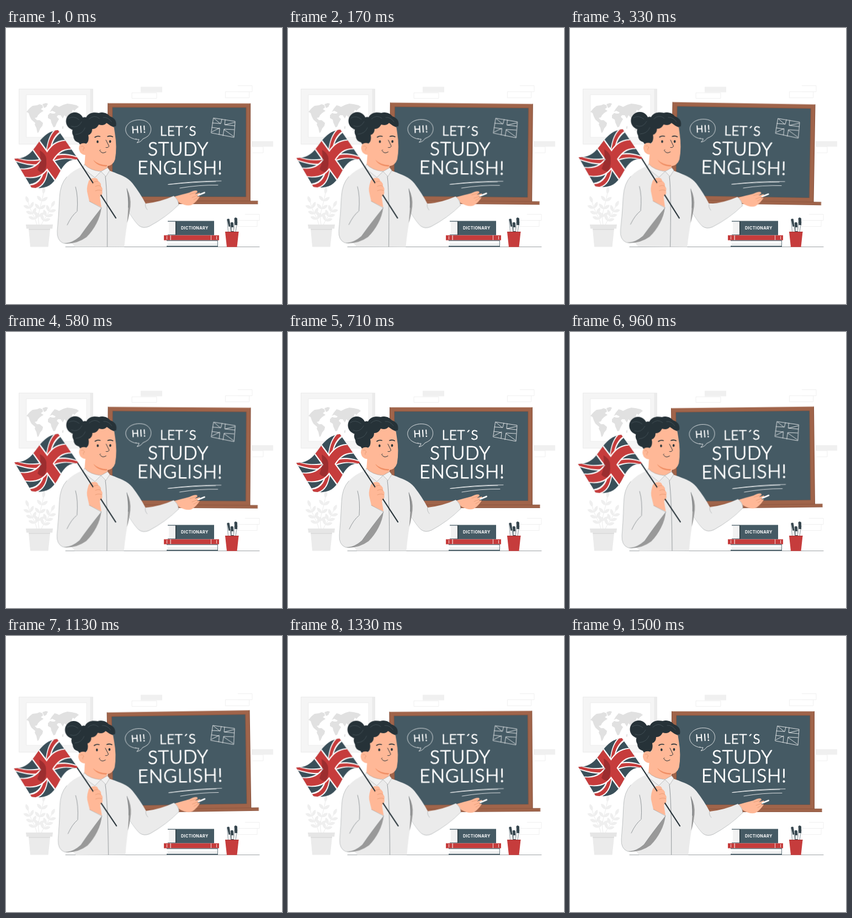
Write an HTML page that moves like this. It is 500 by 500 pixels and loops after 1540 ms.

```html
<!DOCTYPE html>
<html lang="en">
<head>
<meta charset="utf-8">
<title>Let's study English</title>
<style>
  html, body { margin: 0; width: 100%; height: 100%; overflow: hidden; background: #fff; }
  svg { display: block; width: 100%; height: 100%; }
  .sway { transform-box: view-box; animation: sway 1.54s linear infinite; }
  #board { transform-origin: 320px 227px; }
  #teacher { transform-origin: 187px 275px; }
  @keyframes sway {
    0%, 100% { transform: rotate(.1deg); }
    22% { transform: rotate(1deg); }
    71% { transform: rotate(-1deg); }
  }
  .chalk { font-family: Lato, sans-serif; font-weight: 300; fill: #fff; stroke: #fff; stroke-width: 1.1; stroke-linejoin: round; text-anchor: middle; }
  .sketch { fill: none; stroke: #fff; stroke-width: .8; stroke-linecap: round; stroke-linejoin: round; }
  .title { font: 700 7.3px Inter, sans-serif; letter-spacing: .35px; fill: #fff; }
  .line { fill: none; stroke: #263238; stroke-width: .45; stroke-linecap: round; stroke-linejoin: round; }
  .soft { opacity: .55; }
  .crease { stroke: #d98b63; stroke-width: .6; }
  .curl { stroke: #607078; }
  .face { fill: none; stroke: #263238; stroke-width: 1; stroke-linecap: round; stroke-linejoin: round; }
  .brow { stroke-width: 1.7; }
  .red { fill: #c63c3c; }
  .slate { fill: #455a64; }
  .ink { fill: #263238; }
  .skin { fill: #ffb897; }
  .shirt { fill: #ebebeb; }
  .shade { fill: #999; }
  .wood { fill: #a0644a; }
  .edge { fill: #85503b; }
  .outline { fill: none; stroke: #efefef; stroke-width: .9; }
</style>
</head>
<body>
<svg viewBox="0 0 500 500">
  <g id="wall">
    <path fill="#f0f0f0" d="M244 106.500h39v10h-39zM445 205h39v10h-39z"/>
    <path class="outline" d="M228 117.500h45v10h-45zM420 104.500h26v11h-26M397.500 115.500h43v11h-43zM447 215h19v11h-19M433 337.500h26v11h-26M420 348.500h35v11h-35z"/>
    <path fill="#f5f5f5" stroke="#e6e6e6" stroke-width=".7" d="M23.500 110.500h134v100h-134z"/>
    <path fill="#ebebeb" d="M152.500 110.500h5v100h-5z"/>
    <path fill="#fff" stroke="#e6e6e6" stroke-width=".6" d="M37 121h109v77H37z"/>
    <g fill="#e1e1e1">
      <path d="M43 145l5-4 8-1 5-2 5 2 1 4-4 3 5 3-6 4-4 4-2 4-4 1 4 4 5 0 6 5-1 5-4 5-3 7-2 1-2-9-3-6 1-3-7-6-3-6-2-6-4-2z"/>
      <path d="M66 138l6-2 4 1-3 6-4 2z"/>
      <path d="M80 151l3-5 5-6 4 1 4 2 8-4 7-2 8 1 9 2 4 3-4 3-4 4-3-2-2 5 0 4-5 4-2 5-3-5-3-3-3 6-4-6-5 0-2 3 4 4-4 7-3 7-3 1-4-9-1-5-5-3 0-5 4-4 4 1 4 0 2-2-6-3-5 2z"/>
      <path d="M115 172l5 2 4 1-5 1zM118 179l5-2 4 1 3 5-4 3-5-1-4 1zM102 179l2-2 0 5-2 1z"/>
    </g>
  </g>
  <g id="plant"></g>
  <path fill="#e6e6e6" d="M36 356h49l-1 7.500H37z"/>
  <path fill="#ebebeb" d="M41 363.500h39l-3.500 33H44z"/>
  <path fill="#dedede" d="M41 363.500h39l-.4 2.500H41.400z"/>
  <path class="line" d="M108 396.500H459"/>

  <g id="board" class="sway">
    <path class="wood" d="M184 136.500h259v177H184z"/>
    <path class="edge" d="M184 136.500h1v177h-1zM442 136.500h1v177h-1zM192.300 143.600h243v162.400h-243z"/>
    <path class="slate" d="M193 144.300h241.500v161.200H193z"/>
    <path class="wood" d="M171 313h285.500v5.700H171z"/>
    <path class="edge" d="M171 312.800h285.500v.7H171zM171 318.100h285.500v.7H171z"/>
    <text class="chalk" x="312" y="194.800" font-size="24" letter-spacing=".8">LET´S</text>
    <text class="chalk" x="312" y="231.200" font-size="33.500" letter-spacing=".8">STUDY</text>
    <text class="chalk" x="315.500" y="264.800" font-size="33.500" letter-spacing="1">ENGLISH!</text>
    <text class="chalk" x="241" y="190" font-size="17" letter-spacing="1.800" transform="rotate(-4 240 184)">HI!</text>
    <g class="sketch">
      <path d="M236 202C222 200 215 190 217 181C221 168 239 164 251 168C264 173 266 187 257 196Q253 199 248 201Q244 207 237 208Q241 205 241 202Q238 203 235 201"/>
      <path d="M376 163L415 169L413 198L372 190ZM391 165L389 173L374 172M397 166L396 175L414 177M373 180L387 182L386 193M413 184L395 183L393 195"/>
      <path d="M377 164L388 173M414 171L397 175M373 188L387 181M412 196L395 184"/>
      <path d="M294 283.500Q340 277 390 277M294 283.500Q340 279 380 278M315 290Q350 284 384 284.500"/>
    </g>
  </g>

  <g id="books">
    <path fill="#f2f2f2" d="M295 350h13v25h-13z"/>
    <path class="slate" d="M307 349.500h70v26h-70zM293 349.500h15v1.200h-15zM293 374.300h15v1.200h-15z"/>
    <path class="ink" d="M307 350h1.300v25H307z"/>
    <text class="title" x="317" y="365">DICTIONARY</text>
    <path class="red" d="M286 375.500h100v9H286z"/>
    <path fill="#f5d9d6" d="M291 377h1v6h-1zM297.500 375.500h1.300v9h-1.300zM371 375.500h1v9h-1zM381 377h1v6h-1z"/>
    <path fill="#fff" d="M291.500 385h92v11h-92z"/>
    <path class="slate" d="M291 384.500h93v1.300h-93zM291 394.500h93v2h-93zM383.200 385h.8v11h-.8z"/>
    <path class="line soft" d="M293 391.500H383"/>
  </g>

  <g id="cup">
    <path fill="#f4f4f4" stroke="#455a64" stroke-width=".6" d="M400.500 347l4-1 3 24h-5zM414 351h5l-3 19h-4z"/>
    <path fill="#37474f" d="M400.500 346.500q2-2 4 0l2 13-3 .5zM413.500 345q2-3.500 5.500 0l0 12h-4.500zM406.800 353q2.500-2.500 5 0l1 17h-5z"/>
    <path fill="#f4f4f4" d="M408.500 361h3.500l.5 7h-4z"/>
    <path class="red" d="M397 369h24.500l-3 27.800H400z"/>
    <path fill="#a92f2f" d="M397 369h24.500l-.1 1H397.100z"/>
  </g>

  <g id="teacher" class="sway">
    <g id="flag"></g>

    <!-- far arm and hand -->
    <path class="skin" d="M303 306Q320 301 332 298Q341 293 346 294.500L347 297L342 301L351 298L352 301L346 305L351 305Q346 314 337 320Q328 324 314 316Z"/>
    <path class="line crease" d="M333 301Q341 299 346 297M337 307L347 303M340 311L349 306"/>
    <path d="M348.500 302.500L359.500 298" stroke="#fff" stroke-width="2.800" stroke-linecap="round"/>
    <path class="shirt" d="M186 260Q217 266 229 281Q243 299 253 318Q280 315 304 304Q313 310 313 320Q285 346 259 360Q247 365 239 356Q228 343 220 326L204 300Z"/>
    <path class="line soft" d="M223 334Q234 352 241 358Q249 364 260 359Q290 343 313 320M253 318Q251 323 256 329M304 304Q312 310 313 320"/>

    <!-- torso -->
    <path class="shirt" d="M142 250Q122 257 110 270Q99 283 97 307L94 360L125 396.500H214.500Q217 365 224 331Q228 305 219 278Q207 264 186 258Z"/>
    <path class="shade" d="M219 291Q227 306 225.500 323Q223 343 219.500 353Q222 325 221.500 314Q221 302 219 291Z"/>
    <path class="line" d="M180 269Q184 300 183.700 396M219 291Q223 310 222 325"/>

    <!-- head -->
    <circle class="ink" cx="124.500" cy="169" r="16"/>
    <path class="ink" d="M136 172C135 164 140 160 145 162C149 153 160 152 168 154C177 151 185 156 188 160C197 163 201 169 199 178L188 180L150 205L142 213Q134 214 132 208Q122 205 122 196Q117 188 123 179Q128 172 136 172Z"/>
    <path class="skin" d="M146 210Q139 207 134 211Q130 217 134 225Q138 230 143.500 230L142 251Q148 264 172 259L186 257L183 250.500Q194 249 197.500 238Q201.500 216 197 190L195.500 180Q188 177 182 172Q177 178 168 175Q163 184 156 183Q156 192 149 194Q151 204 146 210Z"/>
    <path fill="#f08f65" d="M158 239Q167 248 183 248.500L183 251Q165 251 158 239Z"/>
    <path class="line curl" d="M113 164Q122 158 132 166M118 178Q130 183 137 170M150 165Q160 156 169 164M176 162Q185 161 191 170M126 193Q139 192 143 181"/>
    <path class="face brow" d="M161 198Q165 195 170 196.500M184 196.500Q189 194.500 193 197"/>
    <path class="face" d="M181 203L186.500 214Q185 217.500 181 216.500M170.500 223Q174 229 181 224.500M169.500 222l1.500-1"/>
    <path class="line crease" d="M136 215Q140 212 142 218Q139 218 140 222"/>
    <g class="ink"><ellipse cx="165.800" cy="206" rx="1.800" ry="2.500"/><ellipse cx="188.500" cy="205.500" rx="1.800" ry="2.500"/></g>
    <path fill="#f2f2f2" stroke="#777" stroke-width=".4" d="M142 247L139 254L161 271L172 260Q152 258 142 247ZM172 260L181 269L188 258L184 253Z"/>

    <!-- near arm, pole and fist -->
    <path class="shade" d="M173 325C171 345 160 365 146 379Q128 392 106 390.500Z"/>
    <path class="shirt" d="M110 270Q98 283 97 307Q96 336 93 368Q92 385 104 390Q118 392 134 378Q150 355 173 326L151 314Q139 325 128 333L132 300Z"/>
    <path class="line" d="M126 288Q131 305 129 332M128 333Q119 340 111 357"/>
    <path class="line soft" d="M110 270Q98 283 97 307Q96 336 93 368Q92 385 104 390Q118 392 134 378Q150 355 173 326"/>
    <path class="skin" d="M149 280Q151 272 158 272Q166 271 167 277Q173 281 172 287Q176 290 174 296Q176 302 170 306L173 325L151 314L148 301Q145 291 149 280Z"/>
    <path d="M130 238.500L199 344" stroke="#263238" stroke-width="2.200" stroke-linecap="round"/>
    <path class="skin" d="M157 283Q161 275 167 278Q172 281 171 286Q175 289 174 295Q176 301 169 304Q160 306 157 300Z"/>
    <path class="line crease" d="M162 287Q168 284 172 287M162 295Q169 292 174 295M157 282Q160 277 166 278"/>
    <path class="line soft" d="M151 314L173 326"/>
  </g>
</svg>
<script>
  const NS = 'http://www.w3.org/2000/svg';
  const add = (id, tag, attrs) => {
    const el = document.createElementNS(NS, tag);
    for (const k in attrs) el.setAttribute(k, attrs[k]);
    return document.getElementById(id).appendChild(el);
  };
  const bez = (p, t) => [0, 1].map(i =>
    (1 - t) ** 3 * p[0][i] + 3 * t * (1 - t) ** 2 * p[1][i] + 3 * t * t * (1 - t) * p[2][i] + t ** 3 * p[3][i]);

  // Waving cloth: u runs from hoist to fly, v from the upper to the lower edge.
  const upper = [[94, 185], [52, 190], [58, 238], [15, 237]];
  const lower = [[131, 238], [86, 236], [106, 300], [46, 289]];
  const cloth = (u, v) => {
    const a = bez(upper, u), b = bez(lower, u);
    return [a[0] + (b[0] - a[0]) * v, a[1] + (b[1] - a[1]) * v];
  };
  const patch = (corners, fill) => {
    const pts = [];
    corners.forEach(([u, v], i) => {
      const [u2, v2] = corners[(i + 1) % corners.length];
      for (let s = 0; s < 1; s += .05) pts.push(cloth(u + (u2 - u) * s, v + (v2 - v) * s).map(n => n.toFixed(2)));
    });
    add('flag', 'path', { d: 'M' + pts.join('L') + 'Z', fill });
  };
  const rect = (u1, v1, u2, v2, fill) => patch([[u1, v1], [u2, v1], [u2, v2], [u1, v2]], fill);
  const diagonals = (w, h, fill) => {
    patch([[0, 0], [w, 0], [1, 1 - h], [1, 1], [1 - w, 1], [0, h]], fill);
    patch([[1, 0], [1, h], [w, 1], [0, 1], [0, 1 - h], [1 - w, 0]], fill);
  };
  const cross = (w, h, fill) => {
    rect(.5 - w, 0, .5 + w, 1, fill);
    rect(0, .5 - h, 1, .5 + h, fill);
  };
  rect(0, 0, 1, 1, '#3a4f59');
  diagonals(.075, .11, '#fff');
  diagonals(.045, .065, '#c63c3c');
  cross(.12, .165, '#fff');
  cross(.095, .13, '#c63c3c');
  add('flag', 'path', { d: 'M61 222Q74 229 73 241Q74 253 69 261Q64 264 57 257Q64 241 61 222Z', fill: '#3b0d14', opacity: .3 });

  // Leafy stems: base, two controls, tip.
  const stems = [
    [[56, 357], [53, 342], [44, 333], [40, 314]],
    [[60, 357], [55, 335], [65, 322], [68, 297]],
    [[64, 357], [68, 346], [77, 338], [83, 322]]
  ];
  const leaf = ([x, y], turn) => add('plant', 'path', {
    d: 'M0 0C-4 -4 -3.500 -10 0 -13C3.500 -10 4 -4 0 0Z', fill: '#efefef',
    transform: `translate(${x} ${y}) rotate(${turn})`
  });
  for (const s of stems) {
    add('plant', 'path', { d: `M${s[0]}C${s.slice(1).join(' ')}`, fill: 'none', stroke: '#e6e6e6', 'stroke-width': .8 });
    const lean = Math.atan2(s[3][0] - s[0][0], s[0][1] - s[3][1]) * 180 / Math.PI;
    for (const t of [.25, .5, .75]) for (const side of [-48, 48]) leaf(bez(s, t), lean + side);
    leaf(bez(s, .95), lean);
  }
</script>
</body>
</html>
```
